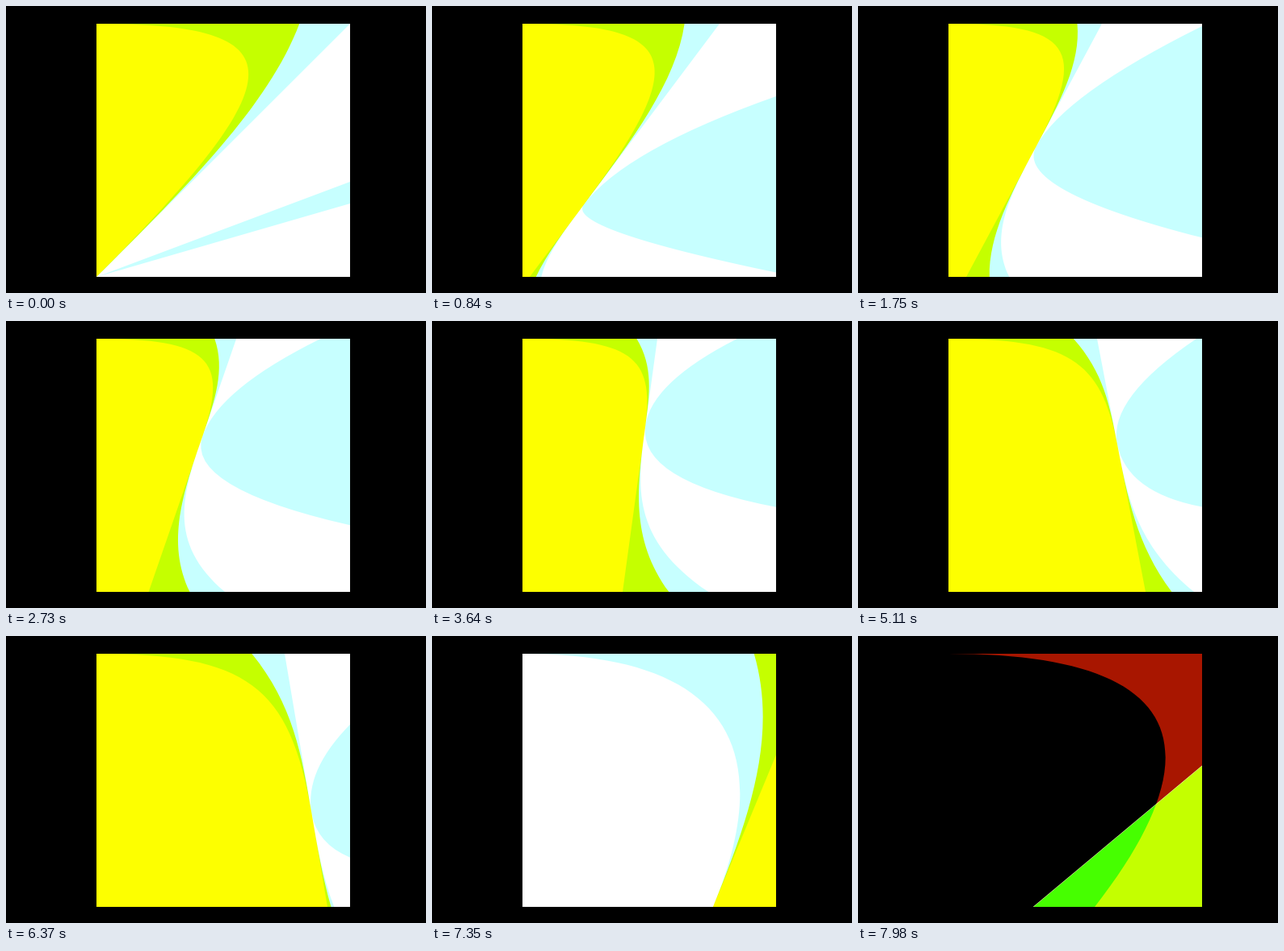
Animation, 520 px wide and 356 px high, one loop 8000 ms. Source, as an HTML page with a canvas:

```html
<!DOCTYPE html>
<html lang="en">
<head>
<meta charset="utf-8">
<title>Touching curves</title>
<style>
html, body { margin: 0; height: 100%; overflow: hidden; background: #000; }
canvas { display: block; }
</style>
</head>
<body>
<canvas id="stage" width="520" height="356"></canvas>
<script>
const ctx = document.getElementById('stage').getContext('2d');
const LOOP = 8000, STEP = 70;
const INVERT_AT = 7000, DETACH_AT = 7350, DARK_AT = 7770;
const left = 112, ceiling = 22, right = 426, floor = 336, size = 314;

// Where the moving line meets the top and bottom edges: [ms, top x, bottom x]
const linePoses = [
  [0, 426, 112], [1750, 302, 134], [3640, 279, 236], [5110, 296, 356],
  [6370, 345, 398], [7350, 478, 348], [7980, 592, 217]
];

// Monotone cubic through one column of the poses
function sample(column, t) {
  const last = linePoses.length - 1;
  const time = i => linePoses[i][0], value = i => linePoses[i][column];
  const slope = i => (value(i + 1) - value(i)) / (time(i + 1) - time(i));
  const tangent = i => {
    if (i === 0) return slope(0);
    if (i === last) return slope(last - 1);
    const a = slope(i - 1), b = slope(i);
    return a * b > 0 ? 2 * a * b / (a + b) : 0;
  };
  let i = 0;
  while (i < last - 1 && t >= time(i + 1)) i++;
  const span = time(i + 1) - time(i), s = (t - time(i)) / span, r = 1 - s;
  return value(i) * r * r * (1 + 2 * s) + value(i + 1) * s * s * (3 - 2 * s)
    + span * s * r * (tangent(i) * r - tangent(i + 1) * s);
}

const mix = (a, b, k) => [a[0] + (b[0] - a[0]) * k, a[1] + (b[1] - a[1]) * k];
const clamp = x => Math.max(0, Math.min(1, x));

function leftOfLine(lineTop, lineBottom) {
  const path = new Path2D();
  path.moveTo(left, ceiling);
  path.lineTo(...lineTop);
  path.lineTo(...lineBottom);
  path.lineTo(left, floor);
  path.closePath();
  return path;
}

function shapes(t) {
  const lineTop = [sample(1, t), ceiling], lineBottom = [sample(2, t), floor];
  const reach = (lineTop[0] - left) / size;
  const swell = Math.sin(Math.PI * Math.min(t, INVERT_AT) / INVERT_AT);
  const detach = clamp((t - DETACH_AT) / (LOOP - DETACH_AT));

  // All curves touch the line at one travelling point, which may leave the square
  const depth = reach - .19 * Math.sin(Math.PI * t / LOOP);
  const innerTouch = mix(lineTop, lineBottom, depth);
  const touch = mix(lineTop, lineBottom, Math.min(1, depth));
  touch[0] += .25 * size * detach;
  const gap = .34 * size * swell ** 2;

  const leave = (path, from, end) => {
    path.bezierCurveTo(...mix(from, lineBottom, .36), ...mix(from, lineBottom, .68), end, floor);
    path.lineTo(left, floor);
    path.closePath();
  };

  const origin = [left, ceiling];
  const apex = [lineTop[0] - .18 * size * detach, ceiling];
  const tension = .8 - .14 * clamp((t - 6370) / 980);
  const outer = new Path2D();
  outer.moveTo(...origin);
  outer.bezierCurveTo(...mix(origin, apex, tension), ...mix(touch, apex, tension), ...touch);
  leave(outer, touch, touch[1] < floor ? lineBottom[0] + gap : touch[0]);

  const inner = new Path2D();
  inner.moveTo(...origin);
  inner.lineTo(left + size * reach * (.9 - .1 * reach), ceiling);
  inner.bezierCurveTo(...mix(innerTouch, lineTop, .68), ...mix(innerTouch, lineTop, .36), ...innerTouch);
  leave(inner, innerTouch, lineBottom[0] + .54 * gap);

  // The bay starts along the top edge (negative) or down the right edge
  const seconds = t / 1000;
  const bayStart = size * (reach - .376 - .31 * swell);
  const bayEnd = size * (depth + .4 * Math.cos(.175 * seconds) - .69 * Math.exp(-2 * seconds));
  const bay = new Path2D();
  bay.moveTo(right + Math.min(0, bayStart), ceiling + Math.max(0, bayStart));
  bay.quadraticCurveTo(...mix(touch, lineTop, .5 * Math.sqrt(swell)), ...touch);
  bay.quadraticCurveTo(...mix(touch, lineBottom, .33), right, ceiling + bayEnd);
  bay.lineTo(right, ceiling);
  bay.closePath();

  return { line: leftOfLine(lineTop, lineBottom), outer, inner, bay, lineTop, lineBottom };
}

function outside(path) {
  const inverse = new Path2D();
  inverse.rect(left, ceiling, 2 * size, size);
  inverse.addPath(path);
  return inverse;
}

function fill(path, color) {
  ctx.fillStyle = color;
  ctx.fill(path, 'evenodd');
}

function drawLight(s, inverted) {
  ctx.fillStyle = '#fff';
  ctx.fillRect(left, ceiling, size, size);
  ctx.globalCompositeOperation = 'multiply';
  const pale = new Path2D(s.line);
  pale.addPath(s.outer);
  if (!inverted) pale.addPath(s.bay);
  fill(pale, '#c7ffff');
  ctx.fillStyle = '#fdff00';
  if (inverted) ctx.fill(outside(s.inner), 'evenodd');
  else ctx.fill(s.inner);
}

function drawDark(s) {
  const beyondOuter = outside(s.outer), beyondLine = outside(s.line);
  fill(beyondOuter, '#a81600');
  fill(beyondLine, '#46ff00');
  ctx.save();
  ctx.clip(beyondLine, 'evenodd');
  fill(beyondOuter, '#c4ff00');
  ctx.restore();
  ctx.strokeStyle = 'rgba(255,255,190,.6)';
  ctx.beginPath();
  ctx.moveTo(...s.lineTop);
  ctx.lineTo(...s.lineBottom);
  ctx.stroke();
}

function draw(t) {
  const s = shapes(t);
  ctx.fillStyle = '#000';
  ctx.fillRect(0, 0, 520, 356);
  ctx.save();
  ctx.beginPath();
  ctx.rect(left, ceiling, size, size);
  ctx.clip();
  if (t < DARK_AT) drawLight(s, t >= INVERT_AT);
  else drawDark(s);
  ctx.restore();
}

const start = performance.now();
function tick() {
  const t = (performance.now() - start) % LOOP;
  draw(Math.floor(t / STEP) * STEP);
  requestAnimationFrame(tick);
}
tick();
</script>
</body>
</html>
```
